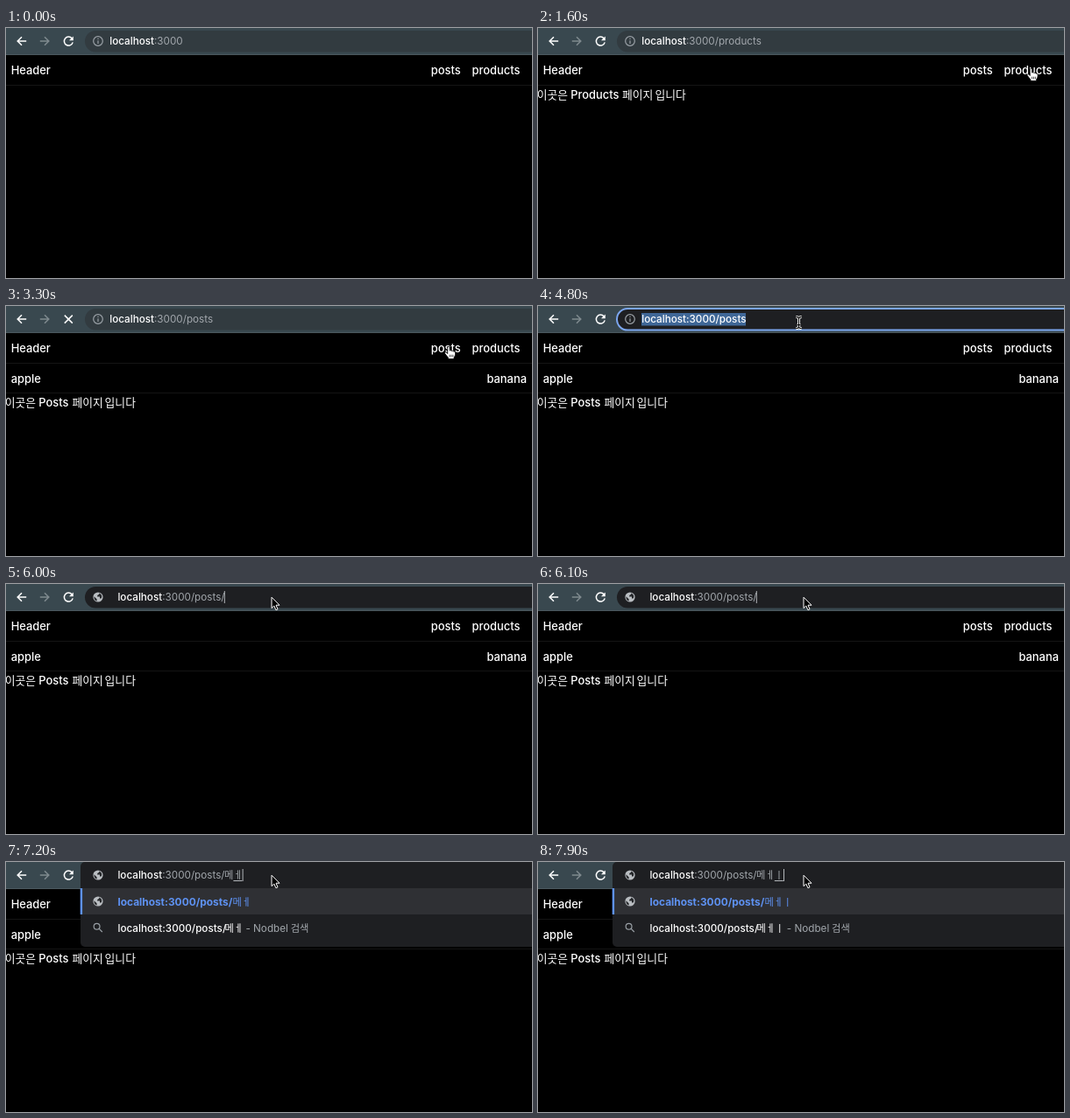
Write an HTML page that moves like this. It is 600 px wide and 286 px high and loops after 8 s.

```html
<!DOCTYPE html>
<html lang="ko">
<head>
<meta charset="utf-8">
<title>Browser navigation</title>
<style>
html, body { margin: 0; width: 100%; height: 100%; overflow: hidden; background: #000; }
svg { display: block; width: 600px; height: 286px; }
text { font: 500 12.9px Inter, "Noto Sans CJK KR", "Noto Sans CJK", sans-serif; fill: #fff; white-space: pre; }
.url { font-size: 11.7px; font-weight: 400; fill: #a2a7ac; }
.host { font-weight: 500; fill: #fff; }
.ko { font-family: "Noto Sans CJK KR", "Noto Sans CJK", sans-serif; font-size: 12.8px; }
.ime { font-family: "Noto Sans CJK KR", "Noto Sans CJK", sans-serif; font-size: 11.3px; }
.soft { font-weight: 400; fill: #a2a7ac; }
.blue { fill: #5e92f3; }
.bold { font-size: 11.9px; font-weight: 700; }
.line { fill: none; stroke: #fff; stroke-width: 1.5; }
.dim { stroke: #7f8a8f; }
.gray { stroke: #9aa0a6; stroke-width: 1.2; }
.rule { stroke: #141414; }
</style>
</head>
<body>
<svg viewBox="0 0 600 286">
  <defs>
    <g id="globe">
      <circle r="5.6" fill="#b9bdc1"/>
      <path d="M-4.6-.8L-1.4 2.2V4.6C-3.4 4-4.8 2-4.6-.8ZM1.2-4.4V-3.2L-.8-2V-.6H2V1.6H3.6C5.2-.8 3.8-3.6 1.2-4.4Z" fill="#25272a"/>
    </g>
    <path id="beamLine" d="M-3.2-6.6Q0-6.6 0-4.4Q0-6.6 3.2-6.6M0-4.4V4.4M-3.2 6.6Q0 6.6 0 4.4Q0 6.6 3.2 6.6M-1.8 2.6H1.8"/>
  </defs>
  <rect width="600" height="286"/>

  <g id="page">
    <text x="5.7" y="53">Header</text>
    <text x="484.8" y="53">posts</text>
    <text x="531.6" y="53">products</text>
    <path class="rule" d="M0 65.5H600"/>
    <g id="subnav">
      <text x="5.8" y="87.5">apple</text>
      <text x="548.4" y="87.5">banana</text>
      <path class="rule" d="M0 99.5H600"/>
    </g>
    <g id="body">
      <text class="ko" x="-1.2" y="0">이곳은</text>
      <text id="title" x="37.3" y="0"></text>
      <text class="ko" id="word1" y="0">페이지</text>
      <text class="ko" id="word2" y="0">입니다</text>
    </g>
  </g>

  <rect width="600" height="31" fill="#39484f"/>
  <rect y="30" width="600" height="1" fill="#4b585e"/>
  <path class="line" d="M23.2 15H13.4M18 10.2L13.2 15L18 19.8"/>
  <path class="line dim" d="M38.8 15H48.6M44 10.2L48.8 15L44 19.8"/>
  <g id="reload">
    <path class="line" d="M75.2 11.8A5 5 0 1 0 76.2 16.4"/>
    <path d="M76.8 9.4V14.2H72Z" fill="#fff"/>
  </g>
  <path id="stop" class="line" d="M66.8 10.6L75.8 19.6M75.8 10.6L66.8 19.6"/>

  <rect id="pill" x="90" y="3" width="530" height="24.5" rx="12.2"/>
  <g id="popup">
    <rect x="85" y="0" width="540" height="97" rx="5" fill="#1e1f22"/>
    <rect x="85" y="30" width="515" height="30" fill="#2f3034"/>
    <rect x="84.7" y="30" width="2.4" height="30" fill="#5e92f3"/>
    <use href="#globe" x="105" y="45"/>
    <text class="url blue bold" x="127.5" y="49.6">localhost:3000/posts/</text>
    <text class="ime blue" id="ime2" x="258.6" y="49.6"></text>
    <circle class="line gray" cx="103.6" cy="73.8" r="3.4"/>
    <path class="line gray" d="M106 76.2L109.8 80"/>
    <text class="url host" x="127.5" y="79.6">localhost:3000/posts/</text>
    <text class="ime" id="ime3" x="249.6" y="79.6"></text>
    <g id="search">
      <text class="url" x="0" y="79.6">- Nodbel</text>
      <text class="ime soft" x="51.3" y="79.6">검색</text>
    </g>
  </g>
  <g id="info">
    <circle class="line gray" cx="105" cy="15" r="5.3"/>
    <path class="line gray" d="M105 14.2V18M105 11.8V13.1"/>
  </g>
  <use id="world" href="#globe" x="105" y="15"/>
  <rect id="select" x="118" y="8" width="119" height="14.5" fill="#3f6797"/>
  <text class="url" id="url" y="19.3"><tspan class="host">localhost</tspan><tspan id="path"></tspan></text>
  <text class="ime soft" id="ime1" x="249" y="19.3"></text>
  <path id="under" d="M0 21.5H10" stroke="#b4b8bc"/>
  <path id="caret" d="M0 8V22" stroke="#b4b8bc"/>

  <path id="arrow" d="M0 0V12.4L2.8 9.8L4.9 14.5L7 13.6L5 9H9Z" fill="#000" stroke="#fff"/>
  <g id="hand">
    <path d="M-1.3 1C-1.3-.6 1.1-.6 1.1 1V4.6C1.8 4 3.2 4.2 3.4 5C4.2 4.5 5.4 4.8 5.6 5.7C6.6 5.3 7.6 6 7.6 7C7.6 10 7.2 10.5 6 12.6V14H-.6V12.6C-1.6 11.4-3 9.6-4.4 7.8C-5 6.6-3.4 5.6-2.4 6.8L-1.3 8Z" fill="#fff" stroke="#000" stroke-width=".8"/>
    <path d="M1.1 9.2V12M3 9.2V12M4.9 9.2V12" stroke="#000" stroke-width=".7"/>
  </g>
  <g id="beam" fill="none">
    <use href="#beamLine" stroke="#fff" stroke-width="3"/>
    <use href="#beamLine" stroke="#000" stroke-width="1.1"/>
  </g>
</svg>
<script>
const LOOP = 8000, STEP = 100, JAMO = 10.4;
const $ = id => document.getElementById(id);
const show = (id, on) => $(id).style.display = on ? "" : "none";
const move = (id, x, y) => $(id).setAttribute("transform", `translate(${x} ${y})`);
const attr = (id, values) => {
  for (const key in values) $(id).setAttribute(key, values[key]);
};
const say = (id, text) => {
  if ($(id).textContent !== text) $(id).textContent = text;
};
// Last entry whose start time has passed.
const at = (list, t) => list.filter(item => item[0] <= t).pop();

const pointer = [
  [0, "", 0, 0],
  [500, "arrow", 592, 88], [600, "arrow", 581, 72], [700, "arrow", 570, 59],
  [800, "hand", 564, 48], [900, "hand", 562.5, 46.5],
  [1900, "hand", 553, 54], [2000, "arrow", 526, 55],
  [2100, "hand", 509, 49], [2200, "hand", 505, 46.5],
  [4400, "arrow", 480, 42], [4500, "arrow", 410, 31],
  [4600, "beam", 335, 22], [4700, "beam", 297.5, 19],
  [4900, "beam", 301, 17], [5100, "beam", 303, 16],
  [5700, "arrow", 303, 15.2]
];
const paths = [[0, ""], [1200, "/products"], [3000, "/posts"], [5700, "/posts/"]];
const typed = [[0, ""], [6200, "ㅁ"], [6700, "메"], [6900, "메ㅔ"], [7800, "메ㅔㅣ"]];

function drawPage(t) {
  const posts = t >= 3100;
  show("subnav", posts);
  show("body", t >= 1200);
  move("body", 0, posts ? 114.8 : 80.6);
  say("title", posts ? "Posts" : "Products");
  attr("word1", { x: posts ? 75.4 : 96 });
  attr("word2", { x: posts ? 112.6 : 133.4 });
}

function drawBar(t) {
  const loading = (t >= 1100 && t < 1600) || (t >= 2900 && t < 3700);
  const typing = t >= 5700;
  const focus = t >= 4800 && !typing;
  const selected = t >= 4800 && t < 5000;
  const ime = at(typed, t)[1];
  const end = 249 + ime.length * JAMO;

  show("stop", loading);
  show("reload", !loading);
  attr("pill", {
    fill: t >= 4800 ? "#1e1f22" : "#323b40",
    stroke: focus ? "#7ba6ee" : "none",
    "stroke-width": 2
  });
  show("info", !typing);
  show("world", typing);
  show("select", selected);
  say("path", ":3000" + at(paths, t)[1]);
  attr("url", { x: typing ? 127.4 : 118.2 });
  attr("path", { class: selected ? "host" : "" });

  show("popup", t >= 6300);
  for (const id of ["ime1", "ime2", "ime3"]) say(id, ime);
  move("search", 252.6 + ime.length * JAMO, 0);
  show("under", ime);
  move("under", end - JAMO, 0);
  show("caret", t >= 5000);
  move("caret", typing ? end + 0.3 : 237.5, 0);
}

function drawPointer(t) {
  const [, kind, x, y] = at(pointer, t);
  for (const id of ["arrow", "hand", "beam"]) {
    show(id, id === kind);
    if (id === kind) move(id, x, y);
  }
}

function render(now) {
  const t = Math.floor((now % LOOP) / STEP) * STEP;
  drawPage(t);
  drawBar(t);
  drawPointer(t);
}

const start = performance.now();
function tick() {
  render(performance.now() - start);
  requestAnimationFrame(tick);
}
tick();
</script>
</body>
</html>
```
